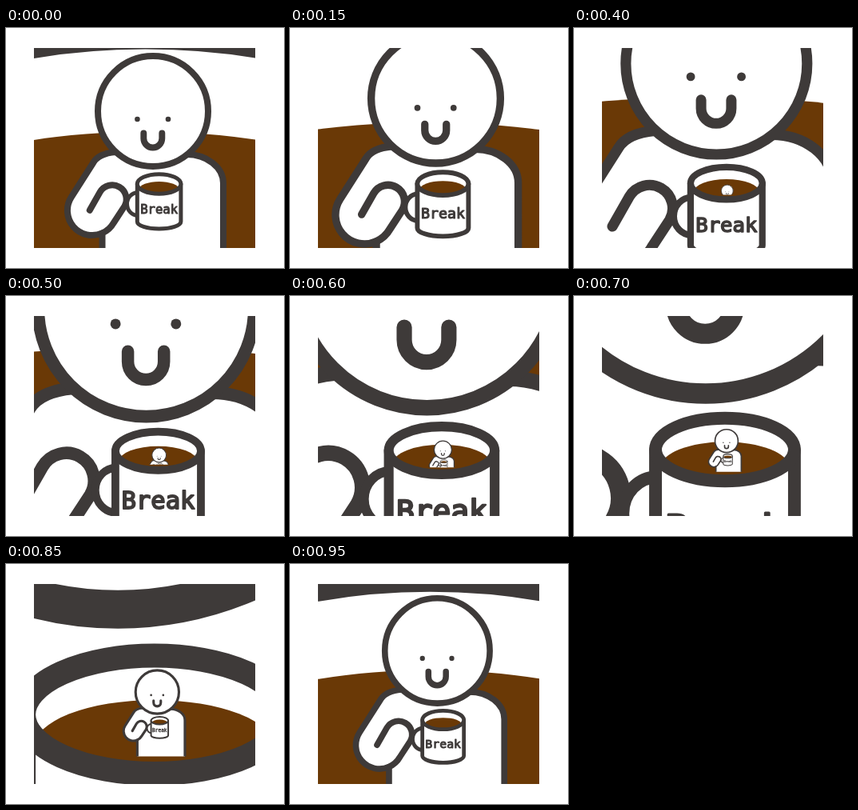
Animation, 348 px wide and 300 px high, one loop 1 s. Source, as an HTML page with a canvas:

```html
<!DOCTYPE html>
<html lang="en">
<head>
<meta charset="utf-8">
<title>Coffee break</title>
<style>
html, body { margin: 0; width: 100%; height: 100%; overflow: hidden; background: #fff; }
canvas { display: block; }
</style>
</head>
<body>
<canvas id="stage" width="348" height="300"></canvas>
<script>
const ctx = document.getElementById('stage').getContext('2d');
const INK = '#3e3a39', COFFEE = '#6a3906';
const CX = 192.8, CY = 196.3;   // point the camera zooms into
const NEST = 0.0657;            // size of the person inside the mug
const STEP = 50, STEPS = 20, SHRINK = 0.049;
const MUG_X = 191.6, RIM_Y = 194.95;

const body = new Path2D('M120.5 330V256.4A31 31 0 0 1 81.7 211.5L109.5 168Q116 157 137 155L226 158A46 36 0 0 1 272 194V330');
const arm = new Path2D('M120.5 256.4A31 31 0 0 0 134.8 243.5L148.3 222.9A17.7 17.7 0 0 0 117.7 205.1L104.8 227.7');
const mouth = new Path2D('M172.3 131.5V138A11.5 11.5 0 0 0 195.3 138V131.5');
const cup = new Path2D('M164.3 195V242A27.3 9 0 0 0 218.9 242V195');
const handle = ellipse(165, 220, 13.5, 14.3);
const head = ellipse(184, 104, 69, 69);
const rim = ellipse(MUG_X, RIM_Y, 27.3, 12.3);
const liquid = ellipse(MUG_X, 201.72, 25.1, 9.8);
const eyes = [ellipse(164.4, 114, 3.3, 3.3), ellipse(203, 114, 3.3, 3.3)];

function ellipse(x, y, rx, ry) {
  const p = new Path2D();
  p.ellipse(x, y, rx, ry, 0, 0, 2 * Math.PI);
  return p;
}

function outline(path, width, fill = '#fff') {
  if (fill) {
    ctx.fillStyle = fill;
    ctx.fill(path);
  }
  ctx.lineWidth = width;
  ctx.stroke(path);
}

// Run draw() with the world scaled about the zoom point
function zoomed(scale, dy, draw) {
  ctx.save();
  ctx.translate(CX, CY + dy);
  ctx.scale(scale, scale);
  ctx.translate(-CX, -CY);
  draw();
  ctx.restore();
}

function drawRim() {
  ctx.save();
  ctx.clip(rim);
  ctx.fillStyle = '#fff';
  ctx.fill(rim);
  ctx.fillStyle = COFFEE;
  ctx.fill(liquid);
  ctx.restore();
  outline(rim, 5, null);
}

function drawPerson() {
  outline(body, 8);
  outline(arm, 8, null);
  outline(head, 8);
  ctx.fillStyle = INK;
  eyes.forEach(eye => ctx.fill(eye));
  outline(mouth, 7.9, null);

  outline(handle, 5);
  outline(cup, 5);
  ctx.fillStyle = INK;
  ctx.font = '15.6px "DejaVu Sans Mono", monospace';
  ctx.textAlign = 'center';
  ctx.lineWidth = 1;
  ctx.fillText('Break', 191.6, 231.8);
  ctx.strokeText('Break', 191.6, 231.8);
  drawRim();
}

function drawNested(rise) {
  ctx.save();
  ctx.beginPath();
  ctx.rect(100, 100, 200, 103.7);
  ctx.clip();
  zoomed(NEST, rise, drawPerson);
  ctx.restore();
}

function render(t) {
  const scale = 1 / (1 - SHRINK * t / STEP);
  const rise = Math.max(0, 18.14 - 0.0306 * (t - 150));
  ctx.fillStyle = '#fff';
  ctx.fillRect(0, 0, 348, 300);
  ctx.save();
  ctx.beginPath();
  ctx.rect(35, 25, 277, 250);
  ctx.clip();
  ctx.strokeStyle = INK;
  ctx.lineCap = ctx.lineJoin = 'round';
  zoomed(scale / NEST, 0, drawRim);
  zoomed(scale, 0, () => {
    drawPerson();
    if (t > 150) drawNested(rise);
  });
  ctx.restore();
}

const start = performance.now();
function tick() {
  const n = Math.floor((performance.now() - start) / STEP) % STEPS;
  render(n * STEP);
  requestAnimationFrame(tick);
}
tick();
</script>
</body>
</html>
```
